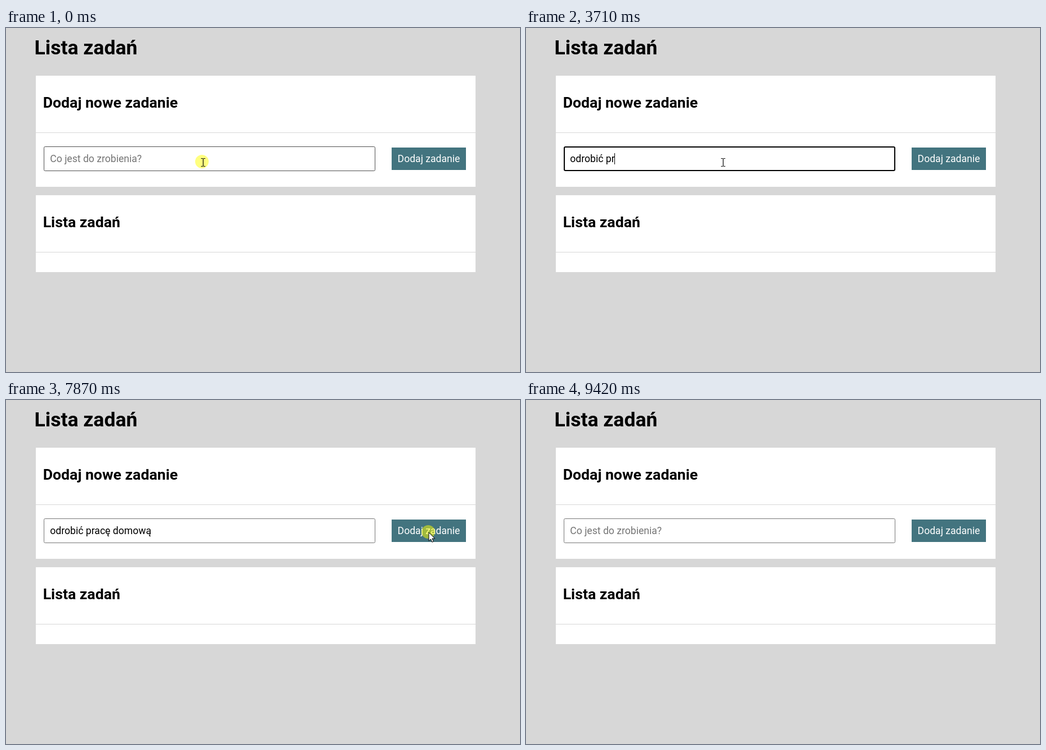
These frames come from a looping animation (913 by 613 pixels, 9.87 s). An HTML page:

```html
<!DOCTYPE html>
<html lang="pl">
<head>
<meta charset="utf-8">
<title>Lista zadań</title>
<style>
  html, body { margin: 0; width: 100%; height: 100%; overflow: hidden; background: #d7d7d7; }
  svg { display: block; width: 913px; height: 613px; }
  text { font: 17.6px Roboto, sans-serif; white-space: pre; }
  .h1 { font-size: 35.5px; font-weight: 700; }
  .h2 { font-size: 26.65px; font-weight: 700; }
  .card { fill: #fff; }
  .rule { fill: #d7d7d7; }
</style>
</head>
<body>
<svg viewBox="0 0 913 613">
  <rect width="913" height="613" fill="#d7d7d7"/>
  <text class="h1" x="50.5" y="47">Lista zadań</text>

  <rect class="card" x="53" y="85" width="781" height="198"/>
  <text class="h2" x="65.7" y="142">Dodaj nowe zadanie</text>
  <rect class="rule" x="53" y="186" width="781" height="1"/>
  <rect id="field" rx="2" fill="#fff"/>
  <text id="entry" x="78.3" y="239"></text>
  <rect id="caret" y="223" width="1" height="20"/>
  <rect x="685" y="213" width="132" height="40" fill="#43747f"/>
  <text x="695.6" y="239" fill="#fff">Dodaj zadanie</text>

  <rect class="card" id="list" x="53" y="298" width="781"/>
  <text class="h2" x="65.7" y="355">Lista zadań</text>
  <rect class="rule" x="53" y="399" width="781" height="1"/>
  <g id="item">
    <rect x="106" y="428" width="29.5" height="29.3" fill="#356514"/>
    <path id="tick" d="M114.2 442.2l4.4 4.4L127 435" fill="none" stroke="#fff" stroke-width="2.4"/>
    <text id="task" x="154.8" y="447"></text>
    <rect id="strike" x="154" y="441" width="182" height="1"/>
    <rect x="773.5" y="424" width="28.5" height="36" fill="#cd3057"/>
    <g fill="none" stroke="#fff" stroke-width="1.4">
      <path d="M782 436.5l10.5-1.5M785.5 435.5l.3-2 3-.4.5 1.8"/>
      <path d="M783 438.5h9l-.9 10h-7.2zM785.6 440l.5 7M787.5 440v7M789.4 440l-.5 7"/>
    </g>
    <rect x="106" y="469" width="715" height="1" fill="#999"/>
  </g>

  <circle id="glow" r="12" fill="#ff0" fill-opacity=".5"/>
  <path id="beam" d="M346.5 232.5h3M351 232.5h3M350.25 232.5v14M346.5 246.5h3M351 246.5h3"
        fill="none" stroke="#000" stroke-width="1.2"/>
  <path id="arrow" d="M.5 .5v15.2l3.5-3.3 2.4 5.4 2.5-1.1-2.4-5.3h4.8z" fill="#fff" stroke="#000"/>
</svg>
<script>
  const LOOP = 9870, BEAT = 320;
  const FOCUS = 510, SUBMIT = 7870, ADDED = 8190, DONE = 8520, UNDONE = 8970, REMOVED = 9420;

  // Letters typed on each beat; an empty slot is a pause.
  const keys = 'o|d|r||ob|i||ć||| pr|a|c|||ę |d|o||mo|w||ą'.split('|');
  const task = keys.join('');

  const $ = id => document.getElementById(id);
  const set = (id, attrs) => {
    for (const key in attrs) $(id).setAttribute(key, attrs[key]);
  };
  const show = (id, on) => set(id, { visibility: on ? 'inherit' : 'hidden' });
  const between = (t, from, to) => t >= from && t < to;

  function place(id, on, x, y) {
    show(id, on);
    set(id, { transform: `translate(${x} ${y})` });
  }

  function drawField(t) {
    const focused = between(t, FOCUS, SUBMIT);
    const beat = Math.floor((t - FOCUS) / BEAT);
    const typed = between(t, FOCUS, ADDED) ? keys.slice(0, beat + 1).join('') : '';
    const inset = focused ? 1 : 0.5;
    set('field', {
      x: 67 + inset, y: 211 + inset,
      width: 589 - 2 * inset, height: 44 - 2 * inset,
      stroke: focused ? '#000' : t < FOCUS ? '#4f4f4f' : '#767676',
      'stroke-width': 2 * inset
    });
    $('entry').textContent = typed || 'Co jest do zrobienia?';
    set('entry', { fill: typed ? '#000' : '#757575' });

    // The caret blinks off on the second idle beat.
    const idle = beat > 0 && !keys[beat] && !keys[beat - 1];
    set('caret', { x: Math.round(78 + $('entry').getComputedTextLength()) });
    show('caret', focused && !idle);
  }

  function drawList(t) {
    const added = between(t, ADDED, REMOVED);
    const done = between(t, DONE, UNDONE);
    set('list', { height: added ? 201 : 137 });
    show('item', added);
    show('tick', done);
    show('strike', done);
  }

  function drawPointer(t) {
    const [x, y] = t < FOCUS ? [348, 238]
      : t < ADDED ? [750, 235]
      : t < UNDONE ? [119, 438] : [790, 437];
    const pressing = between(t, SUBMIT, REMOVED);
    place('glow', t < FOCUS || pressing, x, y);
    place('arrow', pressing, x + 0.5, y + 0.5);
    show('beam', t < SUBMIT);
  }

  function draw(t) {
    drawField(t);
    drawList(t);
    drawPointer(t);
  }

  $('task').textContent = task;
  const start = performance.now();
  function frame() {
    draw((performance.now() - start) % LOOP);
    requestAnimationFrame(frame);
  }
  frame();
</script>
</body>
</html>
```
